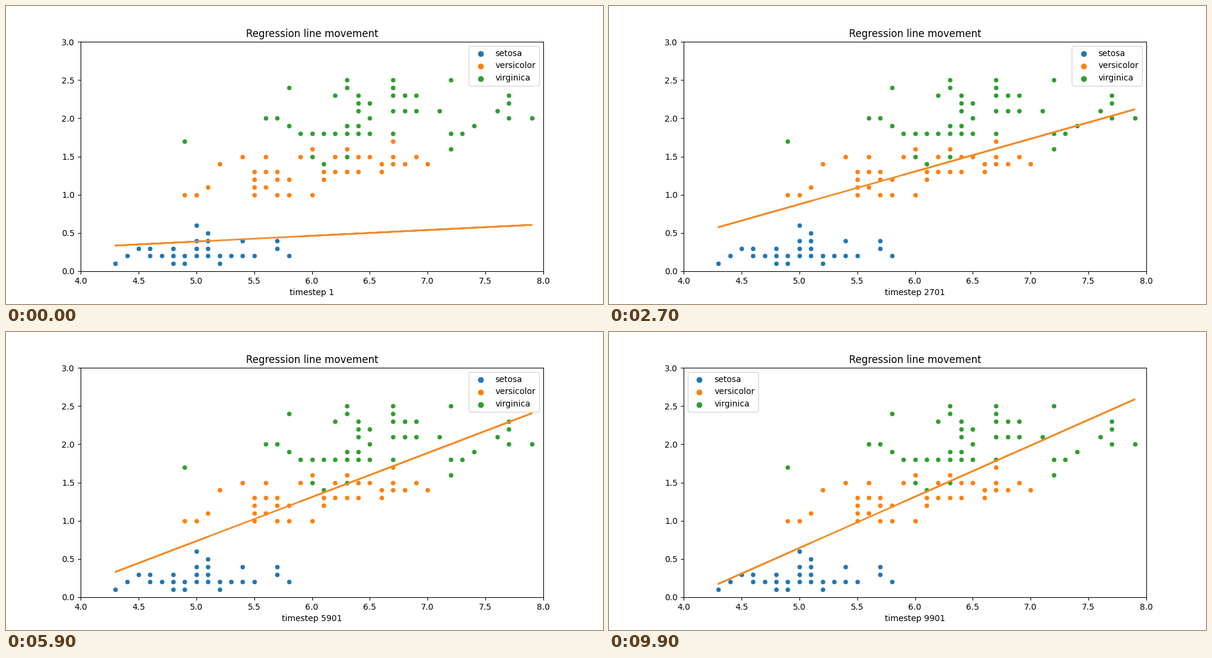
Recreate the animation shown at these times as a matplotlib script. Size 1000x500 px, loop 10 s.

```python
import numpy as np
import matplotlib.pyplot as plt
from matplotlib.animation import FuncAnimation

FRAMES, INTERVAL, STRIDE = 100, 100, 100
RATE = 0.01

# Sample moments of the two measurements
MEAN_X, MEAN_Y = 5.843333, 1.199333
VAR_X, COV_XY = 0.681122, 0.512829

# For each group: height -> positions along x
GROUPS = {
    "setosa": ("tab:blue", {
        0.1: [4.3, 4.8, 4.9, 5.2],
        0.2: [4.4, 4.6, 4.7, 4.8, 4.9, 5.0, 5.1, 5.2, 5.3, 5.4, 5.5, 5.8],
        0.3: [4.5, 4.6, 4.8, 5.0, 5.1, 5.7],
        0.4: [5.0, 5.1, 5.4, 5.7],
        0.5: [5.1],
        0.6: [5.0],
    }),
    "versicolor": ("tab:orange", {
        1.0: [4.9, 5.0, 5.5, 5.7, 5.8, 6.0],
        1.1: [5.1, 5.5, 5.6],
        1.2: [5.5, 5.7, 5.8, 6.1],
        1.3: [5.5, 5.6, 5.7, 6.1, 6.2, 6.3, 6.4, 6.6],
        1.4: [5.2, 6.6, 6.7, 6.8, 7.0],
        1.5: [5.4, 5.6, 5.9, 6.2, 6.4, 6.5, 6.7, 6.9],
        1.6: [6.0, 6.3],
        1.7: [6.7],
    }),
    "virginica": ("tab:green", {
        1.4: [6.1],
        1.5: [6.0, 6.3],
        1.6: [7.2],
        1.7: [4.9],
        1.8: [5.9, 6.0, 6.1, 6.2, 6.3, 6.4, 6.5, 6.7, 7.2, 7.3],
        1.9: [5.8, 6.3, 6.4, 7.4],
        2.0: [5.6, 5.7, 6.5, 7.7, 7.9],
        2.1: [6.4, 6.7, 6.8, 6.9, 7.1, 7.6],
        2.2: [6.4, 6.5, 7.7],
        2.3: [6.2, 6.4, 6.7, 6.8, 6.9, 7.7],
        2.4: [5.8, 6.3, 6.7],
        2.5: [6.3, 6.7, 7.2],
    }),
}


def descend():
    """Gradient descent on slope and intercept, sampled once per frame."""
    mean_xx = VAR_X + MEAN_X ** 2
    mean_xy = COV_XY + MEAN_X * MEAN_Y
    slope = intercept = 0.0
    fits = []
    for step in range((FRAMES - 1) * STRIDE + 1):
        grad_slope = slope * mean_xx + intercept * MEAN_X - mean_xy
        grad_intercept = slope * MEAN_X + intercept - MEAN_Y
        slope -= RATE * grad_slope
        intercept -= RATE * grad_intercept
        if step % STRIDE == 0:
            fits.append((slope, intercept))
    return fits


fits = descend()

fig, ax = plt.subplots(figsize=(10, 5), dpi=100)
ax.set(xlim=(4, 8), ylim=(0, 3), title="Regression line movement")

for name, (color, rows) in GROUPS.items():
    points = np.array([(x, y) for y, xs in rows.items() for x in xs])
    ax.scatter(*points.T, s=36, color=color, edgecolors="white", linewidths=0.48)
    ax.scatter([], [], s=36, color=color, label=name)

# The stroke doubles back at both ends, so only its middle is drawn once
line_x = np.array([5.1, 4.3, 7.9, 5.9])
line, = ax.plot(line_x, line_x * 0, color="#f28c28", lw=2)
ax.legend(loc="best")


def update(i):
    slope, intercept = fits[i]
    line.set_ydata(slope * line_x + intercept)
    ax.set_xlabel(f"timestep {i * STRIDE + 1}")
    return line,


anim = FuncAnimation(fig, update, frames=FRAMES, interval=INTERVAL,
                     init_func=lambda: update(0), repeat=True, repeat_delay=0)
plt.show()
```
